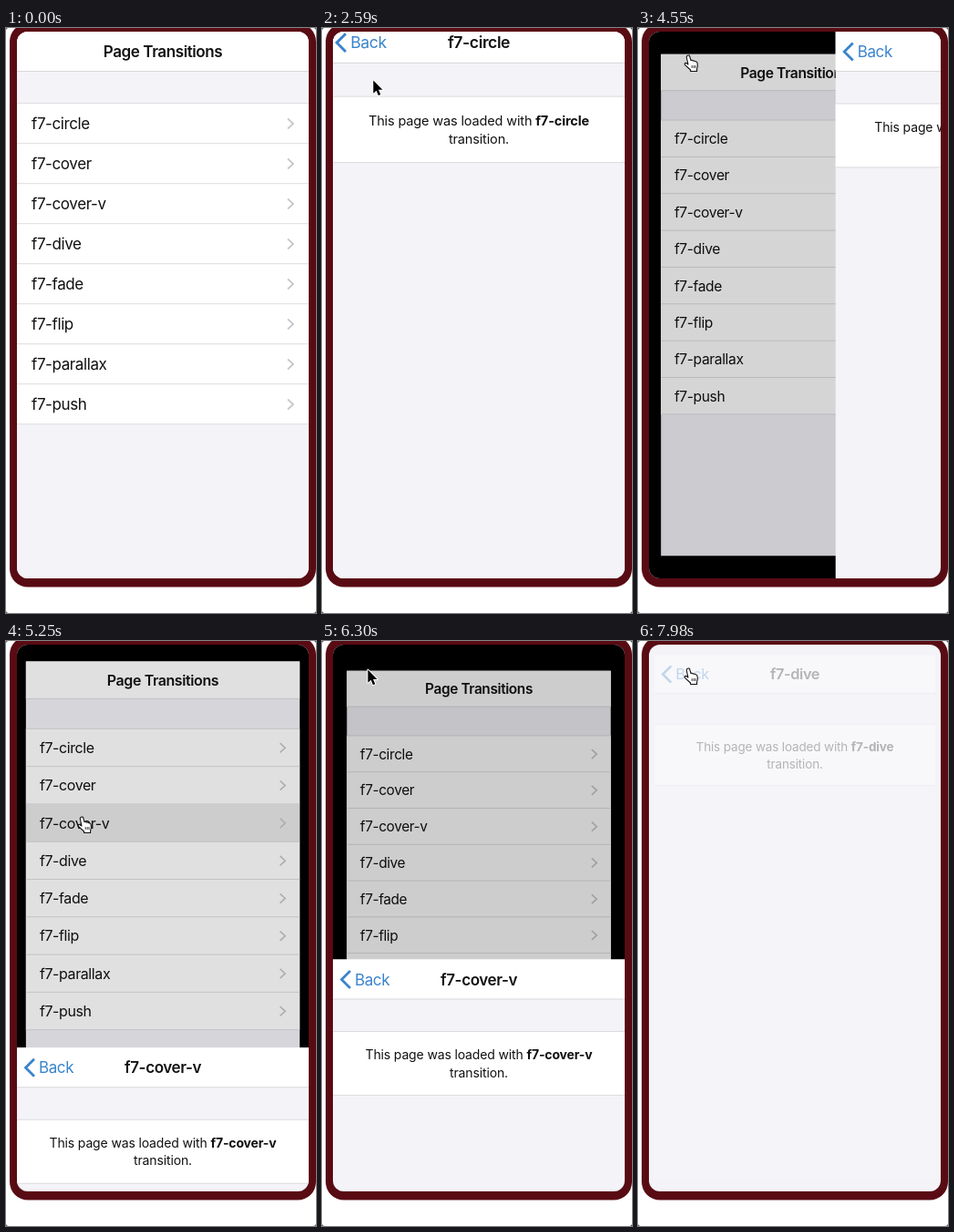
An HTML page with a canvas that plays this animation: 340 by 642 pixels, repeating every 8000 ms.

```html
<!DOCTYPE html>
<html lang="en">
<head>
<meta charset="utf-8">
<title>Page Transitions</title>
<style>
html, body { margin: 0; width: 100%; height: 100%; overflow: hidden; background: #fff; }
canvas { display: block; width: 340px; height: 642px; }
</style>
</head>
<body>
<canvas id="stage"></canvas>
<script>
const W = 340, H = 642, LOOP = 8000;
const PX = 12, PY = 4, PW = 320, PH = 600, ROW = 44, TOP = 79;
const BG = '#f4f3f8', INK = '#111113', BLUE = '#3a84cc', LINE = '#dcdce0';
const FONT = 'Inter, Roboto, sans-serif';
const ITEMS = ['circle', 'cover', 'cover-v', 'dive', 'fade', 'flip', 'parallax', 'push'];

const canvas = document.getElementById('stage');
const ctx = canvas.getContext('2d');
const dpr = window.devicePixelRatio || 1;
canvas.width = W * dpr;
canvas.height = H * dpr;

// One visit per row: way in, way back, and when the pointer leaves the back link
const VISITS = [
  { go: 1240, back: 2484, leave: 2450, dur: 560 },
  { go: 3314, back: 4317, leave: 4560, dur: 630 },
  { go: 5134, back: 6091, leave: 6270, dur: 630 },
  { go: 6985, back: 7835, leave: LOOP, dur: 700 }
];

// Pointer trips: enter, then back link and next row in turn
const ENTER = 380;
const trips = [{ t: ENTER, dur: 360, x: 124, y: 119 }];
VISITS.forEach((v, i) => trips.push(
  { t: v.go + 300, dur: 500, x: 50, y: 29 },
  { t: v.leave, dur: 460, x: 78, y: 120 + 36 * (i + 1) }
));

const clamp = v => Math.min(1, Math.max(0, v));
const smooth = f => f * f * (3 - 2 * f);
const depth = z => 1200 / (1200 - z);

// cubic-bezier(.25, .1, .25, 1)
function ease(x) {
  if (x <= 0) return 0;
  if (x >= 1) return 1;
  let lo = 0, hi = 1, s = 0.5;
  for (let i = 0; i < 22; i++) {
    s = (lo + hi) / 2;
    if (0.75 * s * (1 - s) + s * s * s < x) lo = s; else hi = s;
  }
  return 0.3 * s * (1 - s) * (1 - s) + 3 * s * s * (1 - s) + s * s * s;
}

function setFont(size, weight) {
  ctx.font = `${weight} ${size}px ${FONT}`;
  ctx.letterSpacing = size > 15 ? '-0.4px' : '-0.14px';
}

function text(str, x, y, size, weight, color, align = 'left') {
  setFont(size, weight);
  ctx.textAlign = align;
  ctx.fillStyle = color;
  ctx.fillText(str, x, y + size * 0.36);
  return ctx.measureText(str).width;
}

function rect(x, y, w, h, color) {
  ctx.fillStyle = color;
  ctx.fillRect(x, y, w, h);
}

function rounded(x, y, w, h, r, color) {
  ctx.beginPath();
  ctx.roundRect(x, y, w, h, r);
  ctx.fillStyle = color;
  ctx.fill();
}

function chevron(x, y, dx, dy, width, color) {
  ctx.beginPath();
  ctx.moveTo(x, y - dy);
  ctx.lineTo(x + dx, y);
  ctx.lineTo(x, y + dy);
  ctx.lineWidth = width;
  ctx.strokeStyle = color;
  ctx.stroke();
}

// Runs draw in page coordinates, scaled about the page centre
function page(draw, { scale = 1, x = 0, y = 0, alpha = 1, radius = PH } = {}) {
  if (alpha <= 0) return;
  ctx.save();
  ctx.globalAlpha = alpha;
  ctx.translate(PX + PW / 2 + x, PY + PH / 2 + y);
  ctx.scale(scale, scale);
  ctx.beginPath();
  ctx.arc(0, 0, radius, 0, 7);
  ctx.clip();
  ctx.translate(-PW / 2, -PH / 2);
  rect(0, 0, PW, PH, BG);
  draw();
  ctx.restore();
}

function navbar(title) {
  rect(0, 0, PW, 43.5, '#fff');
  rect(0, 43, PW, 1, '#d8d8dc');
  text(title, PW / 2, 22, 17, 600, INK, 'center');
}

function listPage(active, tint, dim) {
  navbar('Page Transitions');
  rect(0, TOP, PW, ROW * ITEMS.length, '#fff');
  ITEMS.forEach((name, i) => {
    const y = TOP + i * ROW;
    if (i === active) rect(0, y, PW, ROW, `rgba(0,0,0,${tint})`);
    rect(0, y - 0.8, PW, 1, LINE);
    text('f7-' + name, 16, y + 22, 17, 400, INK);
    chevron(297, y + 22, 6, 5.5, 1.8, '#c7c7cc');
  });
  rect(0, TOP + ROW * ITEMS.length - 0.8, PW, 1, LINE);
  rect(0, 0, PW, PH, `rgba(0,0,0,${dim})`);
}

function detailPage(name) {
  navbar(name);
  chevron(19, 22, -9.5, 9.5, 2.8, BLUE);
  text('Back', 24, 22, 17, 400, BLUE);
  rect(0, TOP, PW, 69.5, '#fff');
  rect(0, TOP - 0.5, PW, 1, LINE);
  rect(0, TOP + 69.5, PW, 1, LINE);
  const lead = 'This page was loaded with ';
  setFont(14, 700);
  const bold = ctx.measureText(name).width;
  setFont(14, 400);
  const x = (PW - bold - ctx.measureText(lead).width) / 2;
  text(name, x + text(lead, x, 104.5, 14, 400, INK), 104.5, 14, 700, INK);
  text('transition.', PW / 2, 124, 14, 400, INK, 'center');
}

function pages(t) {
  const row = VISITS.filter(v => t >= v.go).length - 1;
  const v = VISITS[row];
  if (!v || t >= v.back + v.dur) return page(() => listPage(-1, 0, 0));

  const leaving = t >= v.back;
  const u = clamp((t - (leaving ? v.back : v.go)) / v.dur);
  const p = leaving ? 1 - ease(u) : ease(u);
  const tint = 0.15 * clamp(1 - (t - v.go) / 270);
  const kind = ITEMS[row];
  const list = dim => () => listPage(row, tint, dim);
  const detail = () => detailPage('f7-' + kind);

  if (kind === 'circle') {
    page(list(0));
    page(detail, { scale: depth(150 * (1 - p)), radius: Math.hypot(PW, PH) / Math.SQRT2 * p });
  } else if (kind === 'dive') {
    const out = 1 - ease(2 * u), into = ease(2 * u - 1);
    page(list(0), { scale: depth(150 * p), alpha: leaving ? into : out });
    page(detail, { scale: depth(-150 * (1 - p)), alpha: leaving ? out : into });
  } else {
    rect(PX, PY, PW, PH, '#000');
    page(list(0.46 * p), { scale: depth(-300 * p) });
    page(detail, kind === 'cover' ? { x: PW * (1 - p) } : { y: PH * (1 - p) });
  }
}

const ARROW = new Path2D('M0 0V14.2L3.3 11.2 5.6 16.6 8 15.6 5.7 10.3H10.2Z');
const HAND = new Path2D('M4.3 1.2Q6.2.4 6.8 2.4L8 6.6Q9.6 5.8 10.4 7.1 12 6.6 12.7 7.8 ' +
  '14.6 7.6 15 9.1 16 13.5 14.6 16V18.5H7.6V17L1.4 11.3Q.8 9 2.9 9.5L5 11 3.3 3.3Q3 1.6 4.3 1.2Z');
const FINGERS = new Path2D('M9.2 12V15M11.2 12V15M13 12V15');

// An arrow while it travels, a hand while it rests on a link
function pointer(t) {
  if (t < ENTER) return;
  let x = 137, y = -24, moving = false;
  for (const trip of trips) {
    const f = clamp((t - trip.t) / trip.dur);
    x += (trip.x - x) * smooth(f);
    y += (trip.y - y) * smooth(f);
    moving = moving || (f > 0 && f < 1);
  }
  ctx.save();
  ctx.translate(x, y);
  ctx.lineJoin = 'round';
  if (moving) {
    ctx.strokeStyle = '#fff';
    ctx.lineWidth = 2;
    ctx.stroke(ARROW);
    ctx.fillStyle = '#000';
    ctx.fill(ARROW);
  } else {
    ctx.fillStyle = '#fff';
    ctx.fill(HAND);
    ctx.strokeStyle = '#111';
    ctx.lineWidth = 1.1;
    ctx.stroke(HAND);
    ctx.lineWidth = 0.8;
    ctx.stroke(FINGERS);
  }
  ctx.restore();
}

function draw(t) {
  ctx.setTransform(dpr, 0, 0, dpr, 0, 0);
  rect(0, 0, W, H, '#444');
  rounded(0, 0, W, H, 3, '#fff');
  rounded(4, -5, 336, 618.5, 20, '#590b13');
  ctx.save();
  rounded(PX, PY, PW, PH, 12, BG);
  ctx.clip();
  pages(t);
  ctx.restore();
  pointer(t);
}

const start = performance.now();
function tick() {
  draw((performance.now() - start) % LOOP);
  requestAnimationFrame(tick);
}
tick();
</script>
</body>
</html>
```
